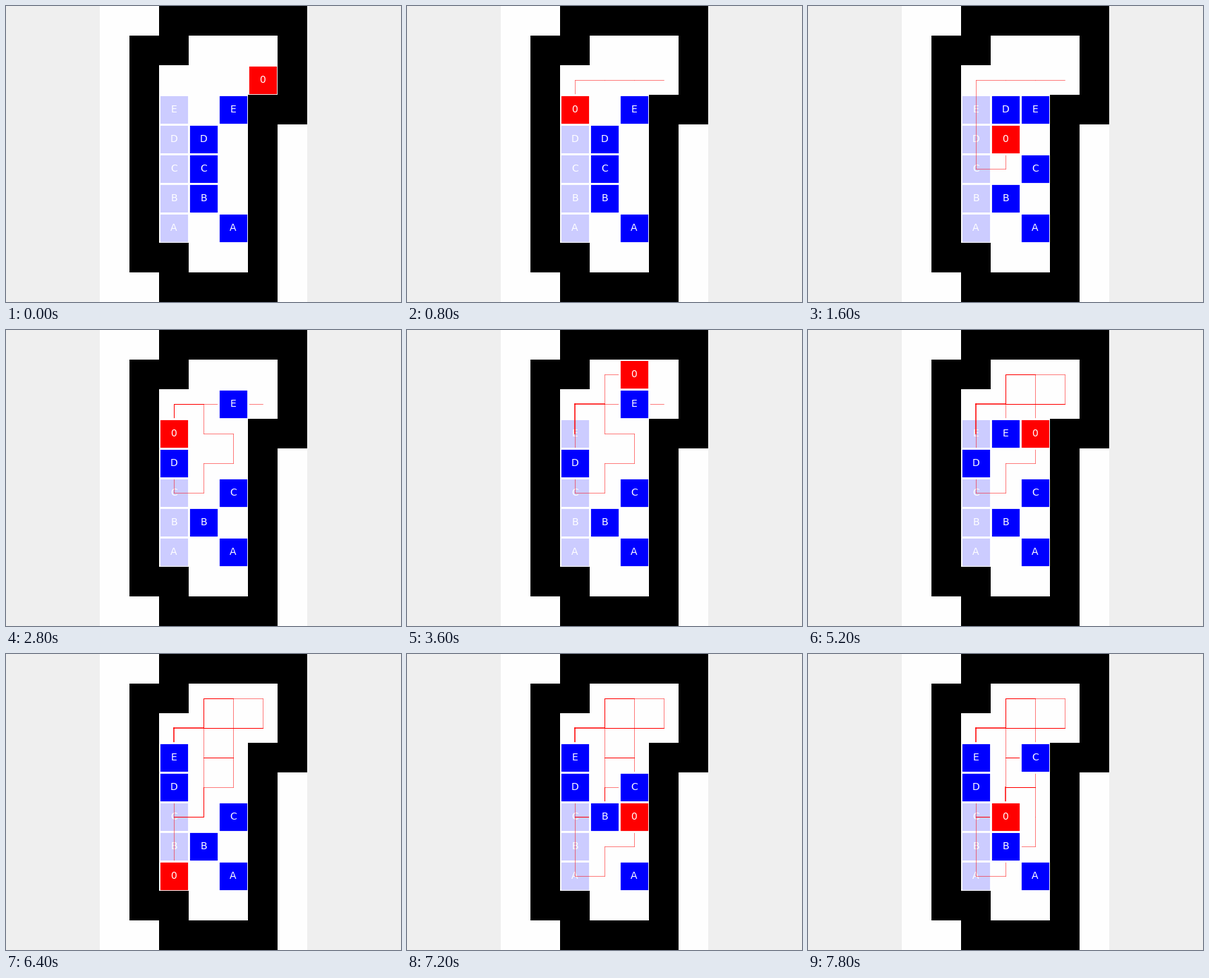
Recreate the animation shown at these times as a matplotlib script. Size 560 by 420 pixels, loop 8 s.

```python
import matplotlib.pyplot as plt
from matplotlib.animation import FuncAnimation
from matplotlib.patches import Rectangle

W, H, DPI = 560, 420, 100
CELL, LEFT = 42, 133
LEVEL = [
    "  #####",
    " ##   #",
    " #    #",
    " #   ##",
    " #   # ",
    " #   # ",
    " #   # ",
    " #   # ",
    " ##  # ",
    "  #### ",
]
GOALS = {"E": (3, 2), "D": (4, 2), "C": (5, 2), "B": (6, 2), "A": (7, 2)}
BOXES = {"E": (3, 4), "D": (4, 3), "C": (5, 3), "B": (6, 3), "A": (7, 4)}
START = (2, 5)
MOVES = "LLLDDDRU" "RULULD" "URUR" "RDLULDRD" "LDDLDD" "RURUULD"
STEP = {"L": (0, -1), "R": (0, 1), "U": (-1, 0), "D": (1, 0)}


def shift(cell, move):
    dr, dc = STEP[move]
    return cell[0] + dr, cell[1] + dc


def corner(cell):
    return LEFT + cell[1] * CELL, cell[0] * CELL


def center(cell):
    x, y = corner(cell)
    return x + CELL / 2, y + CELL / 2


def play():
    """Return player cell, box cells and walked edge counts per step."""
    player, boxes, trail = START, dict(BOXES), {}
    states = [(player, dict(boxes), dict(trail))]
    for move in MOVES:
        target = shift(player, move)
        for name, cell in boxes.items():
            if cell == target:
                boxes[name] = shift(cell, move)
                break
        edge = tuple(sorted((player, target)))
        trail[edge] = trail.get(edge, 0) + 1
        player = target
        states.append((player, dict(boxes), dict(trail)))
    return states


fig = plt.figure(figsize=(W / DPI, H / DPI), dpi=DPI, facecolor="#efefef")
ax = fig.add_axes([0, 0, 1, 1])
ax.set_xlim(0, W)
ax.set_ylim(H, 0)
ax.axis("off")


def block(cell, color, size=(CELL, CELL), edge="none", z=1.0):
    return ax.add_patch(Rectangle(corner(cell), *size, facecolor=color,
                                  edgecolor=edge, zorder=z,
                                  linewidth=0 if edge == "none" else 2))


def tile(cell, label, color, z):
    rect = block(cell, color, edge="white", z=z)
    text = ax.text(*center(cell), label, color="white", size=10,
                   family="DejaVu Sans", ha="center", va="center",
                   zorder=z + 0.5)
    return rect, text


def place(piece, cell):
    rect, text = piece
    rect.set_xy(corner(cell))
    text.set_position(center(cell))


block((0, 0), "#fefefe", (7 * CELL, H), z=0)
for r, line in enumerate(LEVEL):
    for c, mark in enumerate(line):
        if mark == "#":
            block((r, c), "black", z=6)

for name, cell in GOALS.items():
    tile(cell, name, "#ccccff", 1)
pieces = {name: tile(cell, name, "blue", 3) for name, cell in BOXES.items()}
hero = tile(START, "0", "red", 4)

states = play()
edges = {}
for edge in states[-1][2]:
    (x0, y0), (x1, y1) = map(center, edge)
    edges[edge], = ax.plot([x0, x1], [y0, y1], color="red", zorder=2)


def update(i):
    player, boxes, trail = states[i]
    place(hero, player)
    for name, cell in boxes.items():
        place(pieces[name], cell)
    for edge, line in edges.items():
        count = trail.get(edge, 0)
        line.set_visible(count > 0)
        line.set_linewidth(0.36 * count)  # half a pixel per pass
    return []


def reset():
    return update(0)


anim = FuncAnimation(fig, update, frames=len(states), init_func=reset,
                     interval=200, repeat=True, blit=False)
plt.show()
```
